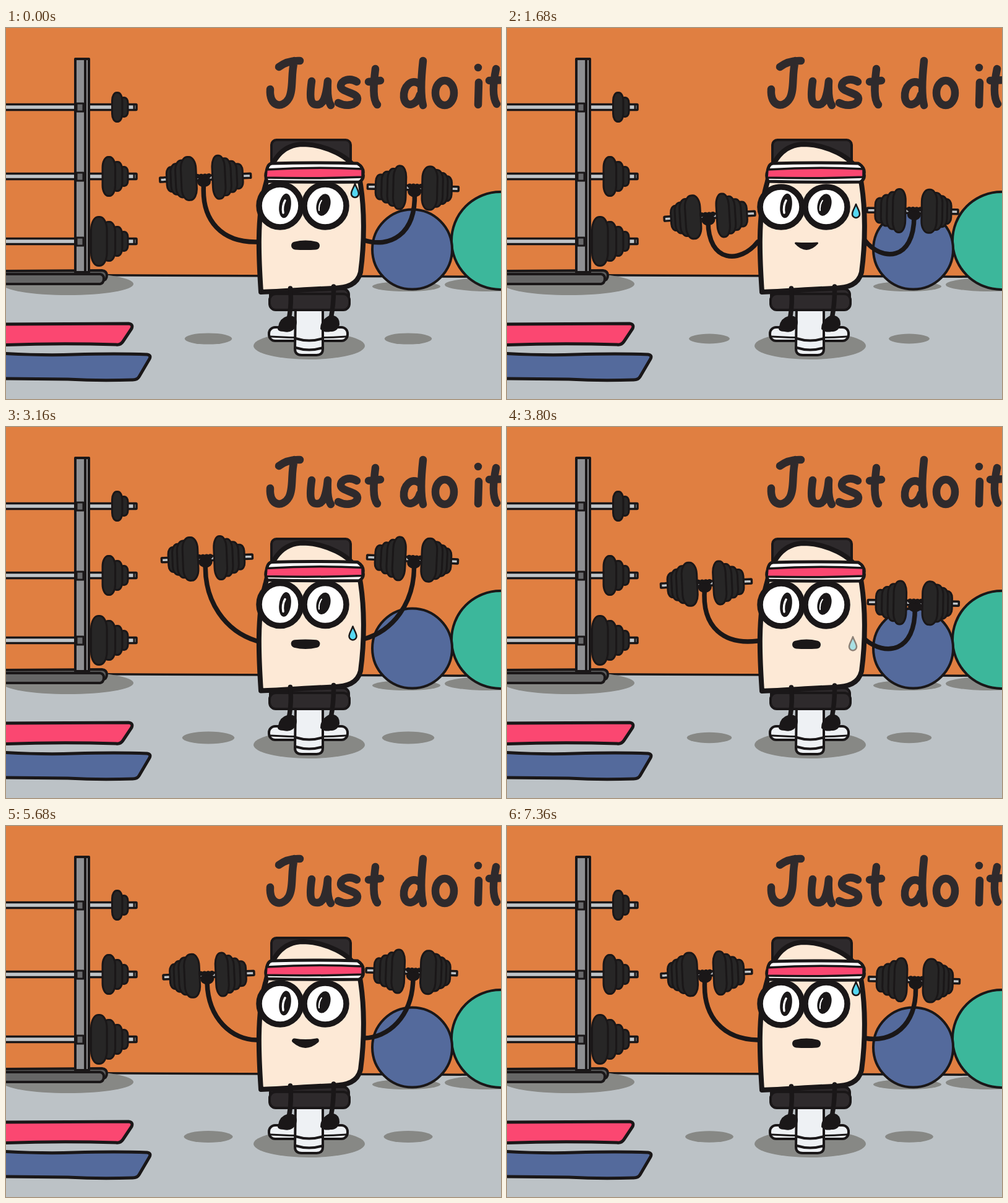
These frames come from a looping animation (800x600 px, 7400 ms). An HTML page:

```html
<!DOCTYPE html>
<html lang="en">
<head>
<meta charset="utf-8">
<title>Dumbbell workout</title>
<style>
  html, body { margin: 0; width: 100%; height: 100%; overflow: hidden; background: #e07f41; }
  svg { display: block; width: 800px; height: 600px; }
  .ink { stroke: #1a1718; stroke-linecap: round; stroke-linejoin: round; stroke-width: 4; }
  .line { fill: none; }
  .dark { fill: #2e2a2c; }
  .plate { fill: #272626; stroke-width: 3; }
  .shade { fill: #878885; }
  .steel { fill: #c0c5c8; stroke-width: 3.5; }
  .blue { fill: #546a9c; }
  .pale { fill: #eef1f4; }
  .limb { fill: none; stroke-width: 7.5; }
  .lettering { fill: none; stroke: #2f2a2c; stroke-width: 12.5; stroke-linecap: round; stroke-linejoin: round; }
</style>
</head>
<body>
<svg viewBox="0 0 800 600">
  <rect width="800" height="600" fill="#e07f41"/>
  <path class="ink" d="M-9 399L809 402.5V609H-9Z" fill="#bcc2c6" style="stroke-width:3.5"/>

  <g class="shade">
    <ellipse cx="100" cy="414" rx="106" ry="18"/>
    <ellipse cx="647" cy="418" rx="55" ry="8"/>
    <ellipse cx="780" cy="415" rx="71" ry="11"/>
    <ellipse cx="490" cy="514" rx="90" ry="22"/>
    <ellipse class="liftShade" cx="327" cy="502.5"/>
    <ellipse class="liftShade" cx="650" cy="502.5"/>
  </g>

  <g class="ink" fill="#5b5b5b">
    <path d="M-9 393L155 392Q163 393 163 400Q163 408 155 409H-9Z"/>
    <path d="M-9 398H152Q158 399 158 405Q158 413 152 414H-9Z" fill="#666"/>
  </g>
  <g id="rack"></g>

  <g class="lettering" role="img" aria-label="Just do it">
    <path d="M441 63Q455 52 475 53M466 53C460 75 465 100 457 114C447 131 425 128 427 99"/>
    <path d="M494 86C490 115 492 124 503 124C515 124 518 105 520 86C519 105 520 118 525 125"/>
    <path d="M567 87C556 80 541 84 541 94C541 104 567 104 568 114C568 126 548 127 537 121"/>
    <path d="M597 66C594 90 592 115 600 124M586 87L605 85"/>
    <path d="M674 53C671 80 670 110 674 125M669 91C655 80 642 95 643 112C645 130 664 126 669 108"/>
    <ellipse cx="709" cy="105" rx="15" ry="20"/>
    <path d="M763 64V64.1M764 88L763 124M792 66C787 90 786 112 793 123M781 85L806 84"/>
  </g>

  <g class="ink" style="stroke-width:5">
    <path d="M-9 479L198 478Q206 479 203 486L189 507Q185 513 178 512Q80 509 -9 513Z" fill="#fb4771"/>
    <path class="blue" d="M-9 526Q60 530 110 528Q180 526 228 528Q235 529 232 535L215 564Q212 569 205 569Q150 571 100 568L-9 567Z"/>
  </g>
  <g class="ink">
    <circle cx="799" cy="344" r="79" fill="#3cb79b"/>
    <circle class="blue" cx="656.5" cy="358" r="64.5"/>
    <rect class="dark" x="429" y="181" width="128" height="50" rx="8"/>
    <rect class="pale" x="425" y="484" width="127" height="22" rx="10"/>
    <path class="line" d="M427 499Q490 503 550 499" style="stroke-width:3"/>
    <path class="pale" d="M468 450H512V519Q512 529 502 529H478Q467 529 467 519Z"/>
    <path class="line" d="M468 502Q490 509 512 502M468 517Q490 524 512 517"/>
    <rect class="dark" x="427" y="422" width="127" height="24" rx="9"/>
    <rect class="dark" x="426" y="430" width="129" height="26" rx="10"/>
  </g>

  <g id="lifts"></g>

  <g id="body" class="ink">
    <path d="M412 427C409 380 404 305 420 252C428 215 445 188 481 188C515 189 558 207 570 236C581 290 579 350 573 395C568 415 552 420 528 421C480 423 450 426 412 427Z" fill="#fde9d6" style="stroke-width:8"/>
    <path d="M430 219Q495 217 568 219Q579 226 577 236Q579 244 571 249Q495 250 422 248Q418 240 421 232Q423 219 430 219Z" fill="#fff" style="stroke-width:5"/>
    <path d="M421 229Q500 224 576 228V241Q500 244 420 242Z" fill="#fb4771" style="stroke-width:3.5"/>
    <g fill="#fff" style="stroke-width:9.5">
      <ellipse class="eye" cx="443" rx="34"/>
      <ellipse class="eye" cx="516" rx="34"/>
    </g>
    <g fill="#1a1718" stroke="none">
      <ellipse cx="451" cy="287.5" rx="9.5" ry="20" transform="rotate(8 451 287.5)"/>
      <ellipse cx="513" cy="286" rx="11" ry="18" transform="rotate(15 513 286)"/>
    </g>
    <g class="line" style="stroke:#fff;stroke-width:3.5">
      <path d="M451 279Q446 288 448 299"/>
      <path d="M510 279Q505 286 506 295" style="stroke-width:2"/>
    </g>
    <path id="mouth" fill="#1a1718"/>
    <path id="drop" d="M0 -11C2 -5 6 0 6 5A6 6 0 0 1 -6 5C-6 0 -2 -5 0 -11Z" fill="#55d8f2" style="stroke-width:2.5"/>
  </g>

  <g class="ink">
    <path id="legs" class="limb"/>
    <path d="M455 468Q444 471 442 483Q438 489 449 489Q462 492 467 481Q470 471 463 468ZM523 467Q510 474 510 486Q515 491 524 489Q535 489 537 479Q537 469 529 467Z" fill="#1a1718"/>
  </g>
</svg>

<script>
const LOOP = 7400, REP = 3700;
const $ = id => document.getElementById(id);
const lerp = (a, b, u) => a + (b - a) * u;
const span = (t, start, length) => Math.min(1, Math.max(0, (t - start) / length));
const ease = (t, start, length) => {
  const u = span(t, start, length);
  return u * u * (3 - 2 * u);
};
const repeat = (n, make) => Array.from({ length: n }, (_, k) => make(k)).join('');

const bar = (x0, x1, y, h) =>
  `<rect class="ink steel" x="${x0}" y="${y - h / 2}" width="${x1 - x0}" height="${h}" rx="1"/>`;
const plate = (x0, x1, y, h) =>
  `<rect class="ink plate" x="${x0}" y="${y - h / 2}" width="${x1 - x0}" height="${h}" rx="${(x1 - x0) * .45}" ry="${h * .27}"/>`;

// Rack: each lower bar carries one more and larger plate.
const rows = [128, 240, 345];
$('rack').innerHTML = rows.map(y => bar(-9, 211, y, 9)).join('')
  + '<g class="ink" fill="#8f9093"><rect x="127" y="50" width="7" height="345"/><rect x="112" y="50" width="16" height="345"/></g>'
  + rows.map((y, row) => `<rect class="ink" x="114" y="${y - 6}" width="11" height="13" fill="#6a6a6c" style="stroke-width:3"/>`
    + repeat(row + 2, k => plate(184 - 11 * k - 1.5 * k * k, 197 - 8 * k - 1.1 * k * k, y, 31 + 16 * k))
    + `<path class="ink" d="M207 ${y - 4}v8" style="stroke-width:3"/>`).join('');

const dumbbell = bar(-69, 78, 0, 7)
  + repeat(4, k => {
    const left = -58 + 6 * k + .6 * k * k, right = 49 - 11 * k, h = 40 + 10 * k;
    return plate(left, left + 17 + 2.5 * k, 0, h) + plate(right, right + 16 + 1.5 * k, 0, h);
  })
  + '<g fill="#1a1718"><ellipse cx="2" cy="6" rx="11" ry="9"/>'
  + repeat(4, k => `<circle cx="${6 * k - 8}" cy="-3" r="3.8"/>`) + '</g>';
const lift = (id, place) => `<g transform="${place}">
  <path id="arm${id}" class="ink limb"/><g id="bell${id}">${dumbbell}</g></g>`;
$('lifts').innerHTML = lift('L', '') + lift('R', 'translate(983 -3) scale(-1 1)');

// Dumbbell depth, 0 up to 1 down, for s ms after the top: slow sink, drop, rest, push with overshoot.
function depth(s, sink, dropStart, dropLength) {
  const low = lerp(sink * span(s, 0, 1150) ** 1.3, 1, ease(s, dropStart, dropLength));
  return low * (1 - ease(s, 2760, 740)) - .03 * Math.sin(Math.PI * span(s, 3440, 240));
}

function poseLift(id, p, range, swing, tilt) {
  const out = swing * Math.sin(Math.PI * Math.max(0, p));
  const x = 323 - out, y = 194 + range * p;
  $('arm' + id).setAttribute('d', `M405 346C${359 + 20 * p - 3 * out} ${320 + 66 * p} ${x + 2 - out} ${262 + 128 * p} ${x + 2} ${y + 8}`);
  $('bell' + id).setAttribute('transform', `translate(${x} ${y}) rotate(${tilt})`);
}

// Mouth: stroke, half width, corner height, upper and lower control height.
const smile = [12, 18.5, 348.5, 354, 361];
const tense = [13, 16.5, 352, 348, 353];
const grin = [3, 17.5, 348, 349, 367];
const moods = [smile, tense, grin, smile];

function poseFace(s) {
  const mood = ease(s, 200, 700) + ease(s, 1400, 720) + ease(s, 2900, 550);
  const k = Math.min(2, Math.floor(mood));
  const [stroke, half, y, up, low] = moods[k].map((v, i) => lerp(v, moods[k + 1][i], mood - k));
  $('mouth').setAttribute('d', `M${484 - half} ${y}Q484 ${up} ${484 + half} ${y}Q484 ${low} ${484 - half} ${y}Z`);
  $('mouth').style.strokeWidth = stroke;

  const squint = Math.max(0, 1 - Math.abs(mood - 2));
  for (const eye of document.querySelectorAll('.eye')) {
    eye.setAttribute('cy', 287.5 + 2 * squint);
    eye.setAttribute('ry', 34.5 - 2 * squint);
  }
  const bob = 2 * Math.max(0, 1 - Math.min(mood, 3 - mood));
  $('body').setAttribute('transform', `translate(0 ${-bob})`);
  $('legs').setAttribute('d', `M459.5 ${421 - bob}Q462 445 457 472M529.5 ${418 - bob}Q530 445 525 470`);
}

function draw(time) {
  const t = time % LOOP, s = (t + 1200) % REP;
  const left = depth(s, .32, 1000, 900), right = depth(s, .42, 1065, 370);
  const lowering = s < 2400 ? 1 : 0;
  poseLift('L', left, 119, 5.5 * lowering, -2 - 1.6 * left);
  poseLift('R', right, 113, 2.5 * lowering, -1 - 2.8 * (1 - right) ** 2);

  for (const shade of document.querySelectorAll('.liftShade')) {
    shade.setAttribute('rx', 44.5 - 6.25 * (left + right));
    shade.setAttribute('ry', 10.5 - 1.4 * (left + right));
  }
  poseFace(s);

  // The sweat drop waits under the headband, then slides and fades.
  const slide = (t + 500) % LOOP - 500;
  $('drop').setAttribute('transform', `translate(${564 - 5 * span(slide, 1700, 2100)} ${263 + .0257 * Math.max(0, slide - 400)})`);
  $('drop').style.opacity = 1 - ease(t, 3400, 800) + ease(t, 6900, 300);
}

const start = performance.now();
function tick() {
  draw(performance.now() - start);
  requestAnimationFrame(tick);
}
tick();
</script>
</body>
</html>
```
